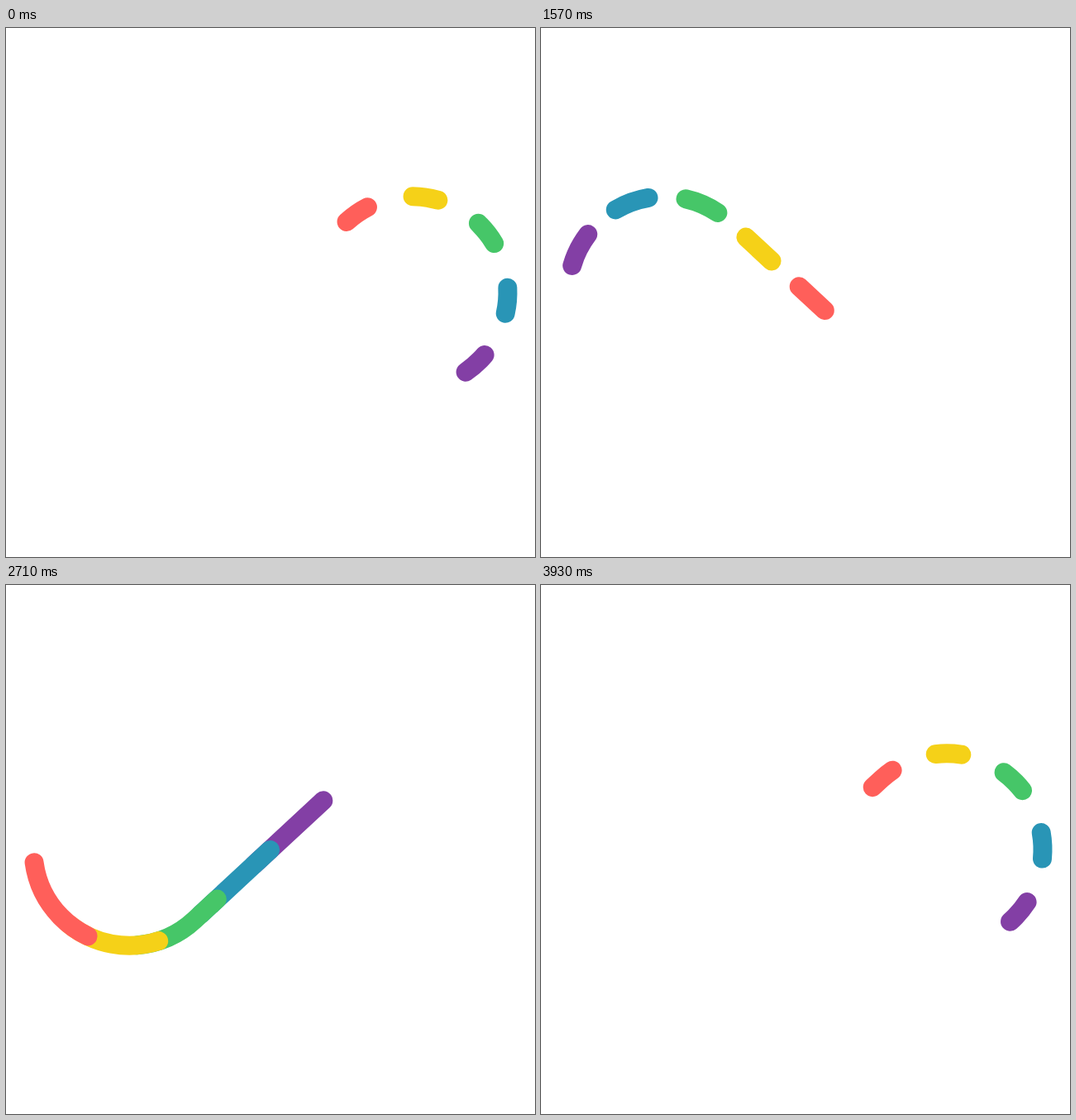
Write an HTML page that moves like this. It is 640 by 640 pixels and loops after 4 s.

```html
<!DOCTYPE html>
<html lang="en">
<head>
<meta charset="utf-8">
<title>Infinity loader</title>
<style>
  html, body { margin: 0; width: 100%; height: 100%; overflow: hidden; background: #fff; }
  svg { display: block; width: 100vw; height: 100vh; }
  path { fill: none; stroke-width: 23; stroke-linecap: round; }
</style>
</head>
<body>
<svg viewBox="0 0 640 640"></svg>
<script>
const LOOP = 4000;
const MID = 320;
const R = 116.2;      // lobe radius
const D = 170.8;      // lobe centre to crossing
const COLORS = ['#833fa5', '#2995b6', '#46c668', '#f5d118', '#ff5f5a']; // leader first

// Tangent points, and the length of one lap.
const dx = D - R * R / D;
const dy = R * Math.sqrt(1 - (R / D) ** 2);
const lap = 4 * (R * (Math.PI - Math.acos(R / D)) + Math.sqrt(D * D - R * R));
const gap = lap / 18;

const pt = (sx, sy) => `${MID + sx * dx} ${MID + sy * dy}`;
const arc = (sweep, end) => `A${R} ${R} 0 1 ${sweep} ${end}`;
const eight = arc(1, pt(1, 1)) + 'L' + pt(-1, -1) + arc(0, pt(-1, 1)) + 'L' + pt(1, -1);
const track = 'M' + pt(1, -1) + eight + eight; // two laps, so no dash meets the seam

const svg = document.querySelector('svg');
const dashes = COLORS.map(color => {
  const path = document.createElementNS(svg.namespaceURI, 'path');
  path.setAttribute('d', track);
  path.setAttribute('stroke', color);
  svg.append(path);
  return path;
});

// Dash length over time: [ms, px], eased in and out.
const SHORT = 31.2, LONG = 126.1;
const KEYS = [[0, SHORT], [720, LONG], [1840, SHORT], [2960, LONG], [4000, SHORT]];

function dashLength(t) {
  const i = Math.max(1, KEYS.findIndex(key => key[0] >= t));
  const [t0, a] = KEYS[i - 1], [t1, b] = KEYS[i];
  const x = (t - t0) / (t1 - t0);
  return a + (b - a) * x * x * (3 - 2 * x);
}

// Shown at 14 steps per second, each on the next tick of a 25 Hz clock.
function stepped(ms) {
  const step = Math.min(55, Math.floor((ms % LOOP + 5) * 14 / 1000));
  return Math.ceil(step * 25 / 14) * 40;
}

function draw(ms) {
  const t = stepped(ms);
  const tail = lap * t / LOOP + 0.4;
  const len = dashLength(t);
  dashes.forEach((path, i) => {
    path.setAttribute('stroke-dasharray', `${len} 9999`);
    path.setAttribute('stroke-dashoffset', -(tail + (4 - i) * gap));
  });
}

const start = performance.now();
function tick() {
  draw(performance.now() - start);
  requestAnimationFrame(tick);
}
tick();
</script>
</body>
</html>
```
